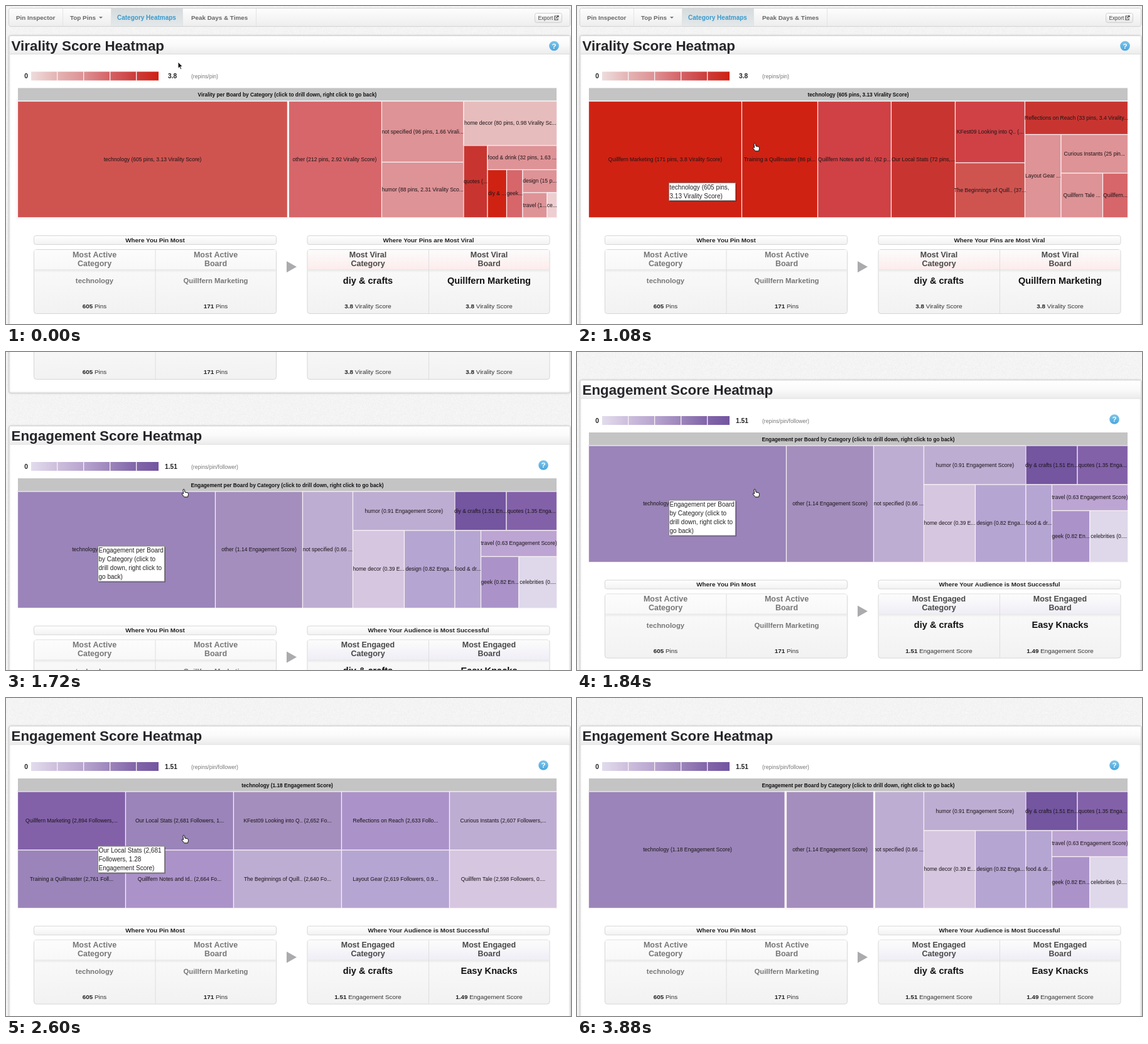
An HTML page with a canvas for the animation above (3.92 s loop, 900 by 506 pixels).

```html
<!DOCTYPE html>
<html lang="en">
<head>
<meta charset="utf-8">
<title>Score Heatmaps</title>
<style>
  html, body { margin: 0; height: 100%; overflow: hidden; background: #f4f4f4; }
  canvas { display: block; }
</style>
</head>
<body>
<canvas width="900" height="506"></canvas>
<script>
const canvas = document.querySelector('canvas');
const ctx = canvas.getContext('2d');
const LOOP = 3920, TICK = 40, PANEL_STEP = 516.5, SCROLL_END = 519;

// ---------- drawing helpers ----------
function text(str, x, y, size, color, { bold = false, align = 'left' } = {}) {
  ctx.font = `${bold ? 'bold ' : ''}${size}px "Liberation Sans", Arial, sans-serif`;
  ctx.textAlign = align;
  ctx.fillStyle = color;
  ctx.fillText(str, x, y);
}
const BOLD = { bold: true }, MID = { align: 'center' }, BOLD_MID = { bold: true, align: 'center' };

function gradient(x0, y0, x1, y1, colors) {
  const g = ctx.createLinearGradient(x0, y0, x1, y1);
  colors.forEach((c, i) => g.addColorStop(i / (colors.length - 1), c));
  return g;
}
const vertical = (y0, y1, ...colors) => gradient(0, y0, 0, y1, colors);

function box(x, y, w, h, fill, stroke, radius = 0) {
  ctx.beginPath();
  ctx.roundRect(x, y, w, h, radius);
  ctx.fillStyle = fill;
  ctx.fill();
  if (stroke) {
    ctx.strokeStyle = stroke;
    ctx.lineWidth = 1;
    ctx.stroke();
  }
}

function rect(x0, y0, x1, y1, color) {
  ctx.fillStyle = color;
  ctx.fillRect(x0, y0, x1 - x0, y1 - y0);
}

function paperPattern() {
  const tile = Object.assign(document.createElement('canvas'), { width: 128, height: 128 });
  const c = tile.getContext('2d');
  let seed = 7;
  for (let i = 0; i < 128 * 128; i++) {
    seed = (seed * 16807) % 2147483647;
    const v = 240 + seed % 8;
    c.fillStyle = `rgb(${v},${v},${v})`;
    c.fillRect(i % 128, i >> 7, 1, 1);
  }
  return ctx.createPattern(tile, 'repeat');
}
const paper = paperPattern();

// ---------- treemaps: nested cuts of one rectangle ----------
const cell = (label, color) => (x0, y0, x1, y1) => [{ label, color, x0, y0, x1, y1 }];
const cutX = (x, left, right) => (x0, y0, x1, y1) => [...left(x0, y0, x, y1), ...right(x, y0, x1, y1)];
const cutY = (y, top, bottom) => (x0, y0, x1, y1) => [...top(x0, y0, x1, y), ...bottom(x0, y, x1, y1)];
const treemap = root => root(18, 151, 877, 336.5);

const RED = { max: '#cf2213', high: '#c83530', strong: '#cf4145', tech: '#cf5450', mid: '#d6666a', soft: '#de9396', pale: '#e7bcbc', min: '#eeced0' };
const VIOLET = { max: '#7355a0', high: '#8261a9', tech: '#9a84b9', other: '#a48ebd', mid: '#ab93c9', soft: '#b5a5d2', light: '#bdadd2', pale: '#d6c6e0', min: '#ded8ea' };

const viralCategories = treemap(
  cutX(448, cell('technology (605 pins, 3.13 Virality Score)', RED.tech),
  cutX(598, cell('other (212 pins, 2.92 Virality Score)', RED.mid),
  cutX(728.5,
    cutY(248, cell('not specified (96 pins, 1.66 Virali...', RED.soft), cell('humor (88 pins, 2.31 Virality Sco...', RED.soft)),
    cutY(221.5, cell('home decor (80 pins, 0.98 Virality Sc...', RED.pale),
    cutX(766.5, cell('quotes (...', RED.high),
    cutY(260, cell('food & drink (32 pins, 1.63 ...', RED.soft),
    cutX(797, cell('diy & ...', RED.max),
    cutX(822.5, cell('geek...', RED.mid),
    cutY(296.5, cell('design (15 p...', RED.soft),
    cutX(861.5, cell('travel (1...', RED.soft), cell('ce...', RED.min))))))))))));

const viralBoards = treemap(
  cutX(262, cell('Quillfern Marketing (171 pins, 3.8 Virality Score)', RED.max),
  cutX(383, cell('Training a Quillmaster (86 pi...', RED.max),
  cutX(500, cell('Quillfern Notes and Id.. (62 p...', RED.strong),
  cutX(602, cell('Our Local Stats (72 pins,...', RED.high),
  cutX(713,
    cutY(249, cell('KFest09 Looking into Q.. (...', RED.strong), cell('The Beginnings of Quill.. (37...', RED.tech)),
    cutY(204, cell('Reflections on Reach (33 pins, 3.4 Virality...', RED.high),
    cutX(770.5, cell('Layout Gear ...', RED.soft),
    cutY(265.5, cell('Curious Instants (25 pin...', RED.soft),
    cutX(837, cell('Quillfern Tale ...', RED.soft), cell('Quillfern...', RED.mid)))))))))));

const engagedCategories = treemap(
  cutX(333, cell('technology (1.18 Engagement Score)', VIOLET.tech),
  cutX(472, cell('other (1.14 Engagement Score)', VIOLET.other),
  cutX(552, cell('not specified (0.66 ...', VIOLET.light),
  cutX(714.5,
    cutY(213, cell('humor (0.91 Engagement Score)', VIOLET.light),
      cutX(634, cell('home decor (0.39 E...', VIOLET.pale), cell('design (0.82 Enga...', VIOLET.soft))),
    cutY(213,
      cutX(796.5, cell('diy & crafts (1.51 En...', VIOLET.max), cell('quotes (1.35 Enga...', VIOLET.high)),
      cutX(756, cell('food & dr...', VIOLET.soft),
      cutY(254.5, cell('travel (0.63 Engagement Score)', '#bca4d3'),
      cutX(816.5, cell('geek (0.82 En...', VIOLET.mid), cell('celebrities (0....', VIOLET.min))))))))));

const engagedBoards = treemap(
  cutX(190, cutY(244, cell('Quillfern Marketing (2,894 Followers,...', VIOLET.high), cell('Training a Quillmaster (2,761 Foll...', VIOLET.tech)),
  cutX(362, cutY(244, cell('Our Local Stats (2,681 Followers, 1...', VIOLET.tech), cell('Quillfern Notes and Id.. (2,664 Fo...', VIOLET.mid)),
  cutX(534, cutY(244, cell('KFest09 Looking into Q.. (2,652 Fo...', VIOLET.other), cell('The Beginnings of Quill.. (2,640 Fo...', VIOLET.light)),
  cutX(706, cutY(244, cell('Reflections on Reach (2,633 Follo...', VIOLET.mid), cell('Layout Gear (2,619 Followers, 0.9...', VIOLET.soft)),
    cutY(244, cell('Curious Instants (2,607 Followers,...', VIOLET.light), cell('Quillfern Tale (2,598 Followers, 0....', VIOLET.pale)))))));

const panels = [
  {
    title: 'Virality Score Heatmap', max: '3.8', maxX: 258, unit: '(repins/pin)', help: [873, 63.5],
    scale: ['#eedcdc', '#e4b4b4', '#de9396', '#d6666a', '#cc403f', '#cf2213'],
    heading: 'Virality per Board by Category (click to drill down, right click to go back)',
    drilledHeading: 'technology (605 pins, 3.13 Virality Score)',
    categories: viralCategories, boards: viralBoards, tint: '#fdecec', tipY: 281,
    result: { pill: 'Where Your Pins are Most Viral', head: 'Most Viral', names: ['diy & crafts', 'Quillfern Marketing'], values: ['3.8', '3.8'], unit: 'Virality Score' },
  },
  {
    title: 'Engagement Score Heatmap', max: '1.51', maxX: 253, unit: '(repins/pin/follower)', help: [856, 109.5],
    scale: ['#e2dcec', '#cdbfdd', '#b9a6d0', '#9f88bd', '#8468ab', '#7355a0'],
    heading: 'Engagement per Board by Category (click to drill down, right click to go back)',
    drilledHeading: 'technology (1.18 Engagement Score)',
    categories: engagedCategories, boards: engagedBoards, tint: '#f0eef6', tipY: 238,
    result: { pill: 'Where Your Audience is Most Successful', head: 'Most Engaged', names: ['diy & crafts', 'Easy Knacks'], values: ['1.51', '1.49'], unit: 'Engagement Score' },
  },
];
const activity = { pill: 'Where You Pin Most', head: 'Most Active', names: ['technology', 'Quillfern Marketing'], values: ['605', '171'], unit: 'Pins' };

// ---------- page parts ----------
function drawNav() {
  box(4.5, 3.5, 894, 29, vertical(3, 32, '#fefefe', '#eeeeee'), '#d3d3d3', 3);
  rect(167, 4, 281, 32, vertical(4, 32, '#d5dadd', '#e4e8ea'));
  for (const x of [90, 167, 281, 398]) rect(x, 4, x + 1, 32, '#e3e3e3');
  text('Pin Inspector', 16, 22, 9.85, '#666', BOLD);
  text('Top Pins', 102, 22, 9.9, '#666', BOLD);
  text('Category Heatmaps', 177, 22, 10, '#3799cc', BOLD);
  text('Peak Days & Times', 295, 22, 9.85, '#666', BOLD);
  ctx.fillStyle = '#777';
  ctx.fill(new Path2D('M148 17h6l-3 3z'));
  box(842.5, 11.5, 43, 15, vertical(11, 26, '#fff', '#e8e8e8'), '#cfcfcf', 3);
  text('Export', 847.5, 22, 8.2, '#444');
  ctx.strokeStyle = '#444';
  ctx.lineWidth = 1.1;
  ctx.stroke(new Path2D('M877 16h-3v6h5v-2.5M876 19.5l4-4M877.5 15.5h2.5v2.5'));
}

function drawTable(x, data, tint, strong) {
  box(x, 365.5, 386, 14, vertical(365, 380, '#fff', '#f2f2f2'), '#d6d6d6', 3);
  text(data.pill, x + 193, 375.5, 9.85, '#222', BOLD_MID);
  box(x, 387.5, 386, 102, vertical(387, 489, '#fcfcfc', '#f2f2f2'), '#d6d6d6', 4);
  rect(x + 1, 388, x + 385, 419, vertical(388, 419, '#fcfcfc', tint));
  rect(x + 1, 419, x + 385, 424, vertical(419, 424, '#e6e6e6', '#f8f8f8'));
  rect(x + 193, 388, x + 194, 489, '#dedede');
  ['Category', 'Board'].forEach((kind, i) => {
    const mid = x + 96.5 + 193 * i, gray = strong ? '#484848' : '#777';
    text(data.head, mid, 399.5, 12.5, gray, BOLD_MID);
    text(kind, mid, 413.5, 12.5, gray, BOLD_MID);
    text(data.names[i], mid, strong ? 441.5 : 441, strong ? 14.6 : 11.3, strong ? '#111' : '#777', BOLD_MID);
    ctx.font = 'bold 9.9px "Liberation Sans", Arial, sans-serif';
    const valueWidth = ctx.measureText(data.values[i] + ' ').width;
    ctx.font = '9.9px "Liberation Sans", Arial, sans-serif';
    const left = mid - (valueWidth + ctx.measureText(data.unit).width) / 2;
    text(data.values[i], left, 481, 9.9, '#222', BOLD);
    text(data.unit, left + valueWidth, 481, 9.9, '#333');
  });
}

function drawMap(panel, drilled, hovered) {
  const cells = drilled ? panel.boards : panel.categories;
  ctx.strokeStyle = '#f8f1f5';
  ctx.lineWidth = 1.2;
  for (const { color, x0, y0, x1, y1 } of cells) {
    rect(x0, y0, x1, y1, color);
    ctx.strokeRect(x0 + .5, y0 + .5, x1 - x0, y1 - y0);
  }
  for (const { label, x0, y0, x1, y1 } of cells)
    text(label, (x0 + x1) / 2 + .5, (y0 + y1) / 2 + 3, 8.55, '#1c1418', MID);
  const halo = !drilled && cells[hovered];
  if (halo) {
    ctx.strokeStyle = '#fbf5f8';
    ctx.lineWidth = 3;
    ctx.strokeRect(halo.x0 - 1, halo.y0 - 1, halo.x1 - halo.x0 + 2.5, halo.y1 - halo.y0 + 2.5);
  }
  rect(19, 130.5, 877, 150.5, '#c4c4c4');
  text(drilled ? panel.drilledHeading : panel.heading, 448, 144, 8.3, '#111', BOLD_MID);
}

function drawPanel(panel, drilled, hovered, tip) {
  ctx.shadowColor = 'rgba(0,0,0,.22)';
  ctx.shadowBlur = 3;
  box(5, 47.5, 893.5, 463.5, '#fff', '#d9d9d9', 3);
  ctx.shadowColor = 'transparent';
  rect(6, 48, 898, 76, vertical(48, 76, '#fff', '#fafafa', '#ececec'));
  rect(6, 76, 898, 77, '#dcdcdc');
  text(panel.title, 8.5, 70.5, 22.4, '#26262b', BOLD);

  const [hx, hy] = panel.help;
  ctx.beginPath();
  ctx.arc(hx, hy, 7.8, 0, 7);
  ctx.fillStyle = vertical(hy - 8, hy + 8, '#7cc6ec', '#4aa5db');
  ctx.fill();
  text('?', hx, hy + 4, 11.5, '#fff', BOLD_MID);

  text('0', 32, 115, 10.3, '#222', BOLD_MID);
  rect(40, 104.5, 243, 118.5, gradient(40, 0, 243, 0, panel.scale));
  for (let x = 81; x < 243; x += 42) rect(x, 104, x + 1.3, 119, '#f8f2f5');
  text(panel.max, panel.maxX, 115, 10.2, '#222', BOLD);
  text(panel.unit, 295, 115, 8.6, '#777');

  drawMap(panel, drilled, hovered);
  drawTable(44.5, activity, '#f8f8f8', false);
  drawTable(480, panel.result, panel.tint, true);
  ctx.fillStyle = '#ababad';
  ctx.fill(new Path2D('M447 406l16 9-16 9z'));

  if (tip) {
    const h = tip.length * 14 + 1;
    rect(148, panel.tipY + 2, 254, panel.tipY + h + 1, 'rgba(0,0,0,.35)');
    box(146.5, panel.tipY + .5, 106, h - 1, '#fff', '#888');
    tip.forEach((line, i) => text(line, 147.5, panel.tipY + 10.5 + 14 * i, 10, '#222'));
  }
}

const arrow = new Path2D('M0 0V10.5L2.4 8.2 4 12 5.8 11.2 4.2 7.5H7.4Z');
const hand = new Path2D('M-3-5q1.2-1.6 2.3 0l.7 4 4 .8q2 .8 1.5 3l-1 4h-5.5l-4-5q.2-1.8 2.5-.3z');
function drawCursor(x, y, isHand) {
  ctx.save();
  ctx.translate(x, y);
  ctx.lineWidth = 1;
  ctx.lineJoin = 'round';
  ctx.fillStyle = isHand ? '#fff' : '#111';
  ctx.strokeStyle = isHand ? '#111' : '#fff';
  ctx.fill(isHand ? hand : arrow);
  ctx.stroke(isHand ? hand : arrow);
  ctx.restore();
}

// ---------- timeline ----------
const ease = (t, start, length) => {
  const u = Math.min(1, Math.max(0, (t - start) / length));
  return u * u * (3 - 2 * u);
};
const between = (t, start, end) => t >= start && t < end;
const tips = [
  { panel: 0, from: 640, to: 1160, lines: ['technology (605 pins,', '3.13 Virality Score)'] },
  { panel: 0, from: 1160, to: 1640, lines: ['Training a', 'Quillmaster (86 pins,', '3.6 Virality Score)'] },
  { panel: 1, from: 1640, to: 1880, lines: ['Engagement per Board', 'by Category (click to', 'drill down, right click to', 'go back)'] },
  { panel: 1, from: 1880, to: 2560, lines: ['technology (1.18', 'Engagement Score)'] },
  { panel: 1, from: 2560, to: 3320, lines: ['Our Local Stats (2,681', 'Followers, 1.28', 'Engagement Score)'] },
];

function draw(t) {
  const scroll = Math.round(SCROLL_END * ease(t, 1475, 320.5));
  const enter = ease(t, 80, 440), leave = ease(t, 3360, 360);
  const x = 274 + 11 * enter + 125 * leave;
  const y = 89 + 135 * enter + 40 * leave;
  const hovered = [
    t < 1400 ? 0 : -1,
    x > 333 ? 1 : between(t, 1880, 2480) || t > 3320 ? 0 : -1,
  ];
  const drilled = [between(t, 1040, 1400), between(t, 2480, 3120)];

  ctx.save();
  ctx.translate(0, -scroll);
  rect(0, scroll, 900, scroll + 506, paper);
  drawNav();
  panels.forEach((panel, i) => {
    const tip = tips.find(tip => tip.panel === i && between(t, tip.from, tip.to));
    ctx.save();
    ctx.translate(0, PANEL_STEP * i);
    drawPanel(panel, drilled[i], hovered[i], tip?.lines);
    ctx.restore();
  });
  ctx.restore();
  if (t < 3740) drawCursor(x, y, y > 131);
}

function tick() {
  draw(Math.floor((performance.now() + 1) % LOOP / TICK) * TICK);
  requestAnimationFrame(tick);
}
tick();
</script>
</body>
</html>
```
